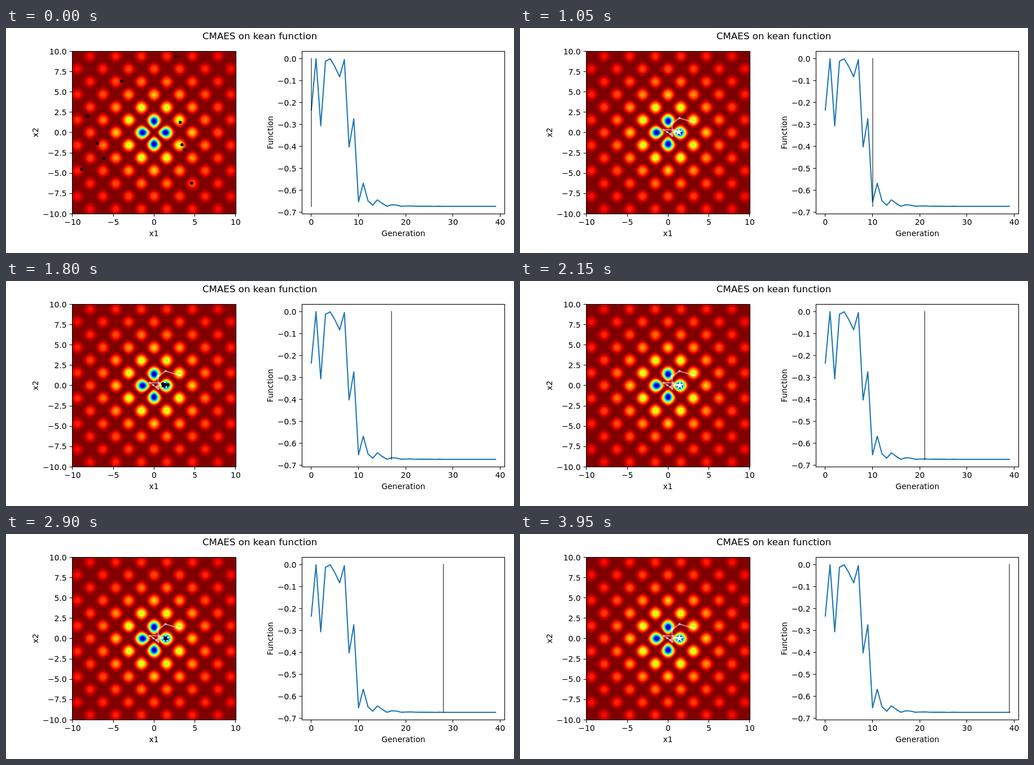
Recreate the animation shown at these times as an HTML page with a canvas. Size 900 px wide and 400 px high, loop 4000 ms.

```html
<!DOCTYPE html>
<html lang="en">
<head>
<meta charset="utf-8">
<title>CMAES on kean function</title>
<style>
  html, body { margin: 0; width: 100%; height: 100%; overflow: hidden; background: #fff; }
  canvas, svg { position: absolute; left: 0; top: 0; }
  canvas { left: 117px; top: 41px; }
  text { font: 13.89px "DejaVu Sans", sans-serif; fill: #000; }
  .title { font-size: 16.67px; }
  .axis { stroke: #000; fill: none; stroke-width: 1.1; }
</style>
</head>
<body>
<canvas id="heat" width="290" height="289"></canvas>
<svg id="stage" width="900" height="400" viewBox="0 0 900 400"></svg>
<script>
const STEP = 50, GENS = 40, POP = 10;
const LEFT = 117, TOP = 41, SCALE = 14.45, MID_X = 262.4, MID_Y = 185.9;
const stage = document.getElementById('stage');
const mapX = x => MID_X + SCALE * x;
const mapY = y => MID_Y - SCALE * y;
const genX = g => 540.9 + 8.368 * g;
const costY = v => 54.6 + 389.8 * v;
const snap = v => Math.floor(v) + 0.5;
const clamp = (v, lo, hi) => Math.min(hi, Math.max(lo, v));

function add(tag, attrs) {
  const el = document.createElementNS('http://www.w3.org/2000/svg', tag);
  for (const k in attrs) el.setAttribute(k, attrs[k]);
  return stage.appendChild(el);
}
function label(str, x, y, attrs = {}) {
  add('text', { x, y, 'text-anchor': 'middle', ...attrs }).textContent = str.replace('-', '\u2212');
}

// Height field, positive where the function dips
function cost(x, y) {
  const r = Math.hypot(x, y);
  return r ? (Math.sin(x - y) * Math.sin(x + y)) ** 2 / r : 0;
}
const hump = (t, a, b, c, d) => 255 * clamp(Math.min((t - a) / (b - a), (d - t) / (d - c)), 0, 1);
const jet = t => [
  hump(t, 0.35, 0.66, 0.89, 1.11),
  hump(t, 0.125, 0.375, 0.64, 0.91),
  hump(t, -0.11, 0.11, 0.34, 0.65)
];
function drawHeat() {
  const cv = document.getElementById('heat'), c = cv.getContext('2d');
  const img = c.createImageData(cv.width, cv.height);
  const bands = 50, sub = [0.25, 0.75];
  const palette = Array.from({ length: bands }, (_, i) => jet(i / (bands - 1)));
  for (let py = 0, p = 0; py < cv.height; py++) {
    for (let px = 0; px < cv.width; px++, p += 4) {
      const sum = [0, 0, 0];
      for (const sx of sub) for (const sy of sub) {
        const x = (LEFT + px + sx - MID_X) / SCALE, y = (MID_Y - TOP - py - sy) / SCALE;
        const band = Math.floor((1 - cost(x, y) / 0.685) * bands);
        palette[clamp(band, 0, bands - 1)].forEach((v, k) => sum[k] += v / 4);
      }
      img.data.set([...sum, 255], p);
    }
  }
  c.putImageData(img, 0, 0);
}

// Axes
function tickX(x, str) {
  add('path', { class: 'axis', d: `M${snap(x)} 330.5v5` });
  label(str, x, 350);
}
function tickY(left, y, str) {
  add('path', { class: 'axis', d: `M${left + 0.5} ${snap(y)}h-5` });
  label(str, left - 9.4, y + 5.1, { 'text-anchor': 'end' });
}
function drawAxes() {
  label('CMAES on kean function', 449.6, 20, { class: 'title' });
  add('rect', { class: 'axis', x: LEFT + 0.5, y: TOP + 0.5, width: 290, height: 289 });
  add('rect', { class: 'axis', x: 524.5, y: TOP + 0.5, width: 359, height: 289 });
  for (let v = -10; v <= 10; v += 5) tickX(mapX(v), String(v));
  for (let v = -10; v <= 10; v += 2.5) tickY(LEFT, mapY(v), v.toFixed(1));
  for (let g = 0; g <= 40; g += 10) tickX(genX(g), String(g));
  for (let i = 0; i <= 7; i++) tickY(524, costY(i / 10), (i ? '-' : '') + (i / 10).toFixed(1));
  label('x1', 262, 370);
  label('Generation', 704, 370);
  label('x2', 0, 0, { transform: 'translate(57 185.8) rotate(-90)' });
  label('Function', 0, 0, { transform: 'translate(473 186) rotate(-90)' });
}

// Search: a wandering start, then a damped swing into the minimum
const best = [[3.2, 1.25], [1.4, 1.78], [0.477, 1.14], [0.51, -0.4], [-0.1, 0.06], [-0.55, 0.35],
  [0.63, 0.33], [0.28, -0.2], [0.9, 0.1], [0.745, 0.08], [1.3, 0.08]];
for (let k = 0; best.length < GENS; k++) {
  best.push([1.393 - 0.3 * Math.exp(-0.2 * k) * Math.cos(Math.PI * k / 3.3), 0.02]);
}
const scattered = [[2.66, 9.38], [-3.98, 6.33], [-8.16, 2], [-6.95, -1.36], [-6.19, -3.13],
  [-8.89, -4.51], [3.42, -1.5], [3.71, -2.12], [4.6, -6.21]];

function seeded(s) {
  return () => {
    s = (s * 1664525 + 1013904223) >>> 0;
    return s / 4294967296;
  };
}
const rnd = seeded(17);
const gauss = () => rnd() + rnd() + rnd() + rnd() - 2;

function swarm(g) {
  if (g === 0) return [best[0], ...scattered];
  const size = 4.4 * Math.exp(-0.155 * g);
  const [cx, cy] = best[g - 1], low = g > 11 ? -0.6 : -2.4;
  const pts = [best[g]];
  while (pts.length < POP) pts.push([Math.max(low, cx + size * gauss()), cy + size * gauss()]);
  return pts;
}
const toStage = ([x, y]) => [mapX(x), mapY(y)];
const swarms = best.map((_, g) => swarm(g).map(toStage));
const trail = best.map(toStage);

drawHeat();
drawAxes();
add('polyline', {
  points: best.map(([x, y], g) => genX(g) + ',' + costY(cost(x, y))).join(' '),
  fill: 'none', stroke: '#1f77b4', 'stroke-width': 2.08, 'stroke-linejoin': 'round', 'stroke-linecap': 'square'
});
const cursor = add('path', { stroke: '#000', 'stroke-opacity': 0.5, 'stroke-width': 2 });
const route = add('polyline', {
  fill: 'none', stroke: '#fff', 'stroke-opacity': 0.5, 'stroke-width': 2, 'stroke-linejoin': 'round'
});
const marks = trail.map(([cx, cy]) => add('circle', { cx, cy, r: 2.1, fill: '#fff', 'fill-opacity': 0.5 }));
const spikes = Array.from({ length: 10 }, (_, i) => {
  const r = i % 2 ? 2.48 : 6.5, a = i * Math.PI / 5;
  return r * Math.sin(a) + ',' + -r * Math.cos(a);
});
const star = add('polygon', {
  points: spikes.join(' '), fill: '#fff', stroke: '#fff', 'stroke-width': 0.9, 'stroke-linejoin': 'round'
});
const dots = swarms[0].map(() => add('circle', { r: 2.75, fill: '#000' }));
const show = (el, on) => el.setAttribute('visibility', on ? 'visible' : 'hidden');

// Each generation: scatter the swarm, then move to its best point.
function draw(step) {
  const gen = step >> 1, scatter = step % 2 === 0;
  const done = scatter ? gen - 1 : gen, at = Math.max(done, 0);
  cursor.setAttribute('d', `M${Math.round(genX(at))} 53.5V318`);
  route.setAttribute('points', trail.slice(0, done + 1).join(' '));
  marks.forEach((m, i) => show(m, i <= done));
  star.setAttribute('transform', `translate(${trail[at]})`);
  show(star, done >= 0);
  dots.forEach((d, i) => {
    const [x, y] = swarms[gen][i];
    d.setAttribute('cx', x);
    d.setAttribute('cy', y);
    show(d, scatter);
  });
}

let last = -1;
function tick() {
  const step = Math.floor(performance.now() / STEP) % (GENS * 2);
  if (step !== last) draw(last = step);
  requestAnimationFrame(tick);
}
tick();
</script>
</body>
</html>
```
